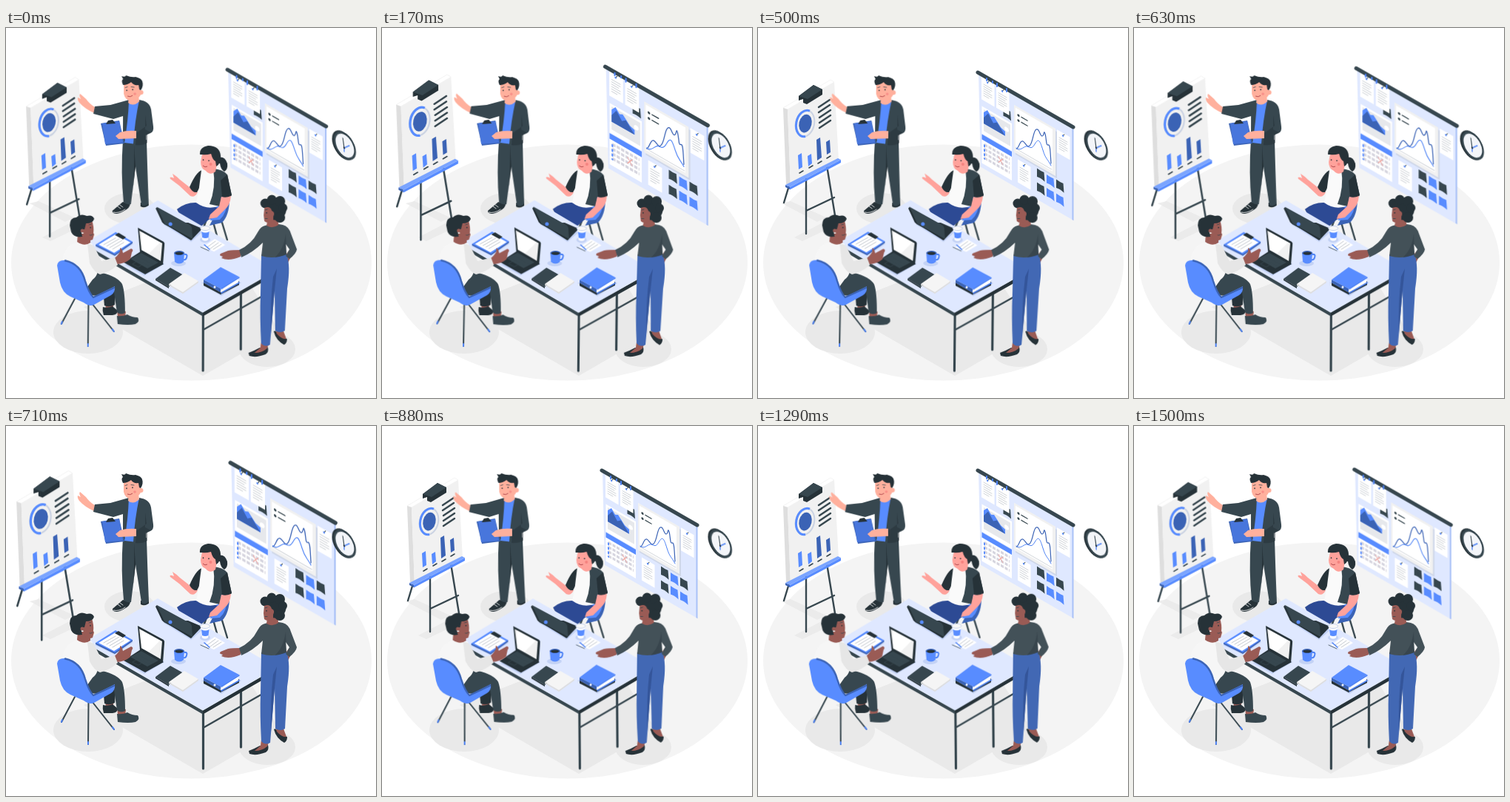
Animation of 500 by 500 pixels, one loop 1540 ms. Source, as an HTML page without scripts:

```html
<!DOCTYPE html>
<html lang="en">
<head>
<meta charset="utf-8">
<title>Team meeting</title>
<style>
html, body { margin: 0; width: 100%; height: 100%; overflow: hidden; background: #fff; }
svg { display: block; width: 100vw; height: 100vh; }

.beat { transform-origin: 234px 165px; animation: beat 1540ms linear -60ms infinite; }
@keyframes beat {
  0%, 25%, 39%, 61%, 100% { transform: scale(1); }
  11.5%, 50% { transform: scale(1.1); }
}
.sway { animation: sway 1540ms linear -60ms infinite; }
@keyframes sway {
  0%, 100% { transform: rotate(0deg); }
  25% { transform: rotate(1deg); }
  75% { transform: rotate(-1deg); }
}

.ink { fill: #263238; } .slate { fill: #37474f; } .blue { fill: #588cff; }
.deep { fill: #3b63b5; } .pale { fill: #dfe8ff; } .white { fill: #fff; }
.off { fill: #f1f1f1; } .grey { fill: #dedede; } .shade { fill: #e9e9e9; }
.skin { fill: #ffb09d; } .rosy { fill: #ffa29b; } .brown { fill: #9a5b55; }
.line { fill: none; stroke: #37474f; stroke-linecap: round; stroke-linejoin: round; }
.thin { stroke-width: .8; } .eye { stroke: #263238; stroke-width: 1.5; } .mid { stroke-width: 2.4; }
.sb { stroke: #4a80f5; } .sd { stroke: #3b63b5; } .sl { stroke: #c4c9cf; } .sw { stroke: #fff; }
</style>
</head>
<body>
<svg viewBox="0 0 500 500">
<defs>
  <g id="note">
    <path class="white" d="M0 0H17.500V31H0Z"/>
    <path class="line sl" stroke-width=".7" d="M3 9H14M3 12H14M3 15H12M3 18H14M3 21H14M3 24H10"/>
    <path class="line thin" d="M8 4L10 1"/>
    <circle class="blue" cx="8" cy="4" r="1.200"/>
  </g>
  <path id="sticky" d="M0 0Q5 1 9.500 0L10.500 12Q5 10 0 11.500Z"/>
</defs>

<!-- floor -->
<ellipse cx="250.500" cy="317" rx="243.500" ry="159.500" fill="#f4f4f4"/>
<g class="shade">
  <ellipse cx="167" cy="244" rx="34" ry="21"/>
  <ellipse cx="111" cy="411" rx="47" ry="29"/>
  <ellipse cx="353" cy="434" rx="38" ry="24"/>
  <path d="M105 377L266 470L370 410L300 300Z"/>
  <path d="M49 283L60 288L112 263L99 257ZM32 237L44 234L92 256L80 262Z" opacity=".8"/>
</g>

<g class="beat">
  <!-- wall board, drawn flat and sheared -->
  <g transform="matrix(1 .577 0 1 298 62)">
    <path class="pale" d="M0 0H127.500V124H3Z"/>
    <path d="M126.500 0H128.500V124H126.500Z" fill="#a9c1f7"/>
    <use href="#sticky" class="slate" x="33.500" y="26"/>
    <use href="#note" x="4" y="1"/>
    <use href="#note" x="24" y="1"/>
    <use href="#note" x="106" y="14"/>
    <use href="#note" x="53" y="85"/>
    <path class="white" d="M4.500 41H45V78H4.500Z"/>
    <path d="M7 44H43V73H7Z" fill="#e6e8ec"/>
    <path class="blue" d="M7 63V48L12 42L17 48L21 46L30 55L36 57V63Z"/>
    <path class="deep" d="M7 63V55L13 46L20 55L25 51L36 63Z"/>
    <circle class="white" cx="38" cy="53" r="3"/>
    <path class="white" d="M4.500 79H45V118H4.500Z"/>
    <path class="blue" d="M4.500 79H45V86H4.500Z"/>
    <path d="M8 91H42M8 97H42M8 103H42M8 109H42" fill="none" stroke="#d6d5df" stroke-width="3.500" stroke-dasharray="4 1.500"/>
    <path d="M8 91V111" fill="none" stroke="#588cff" stroke-width="2" stroke-dasharray="3.500 2.500"/>
    <path d="M27 96L33 104M33 96L27 104" fill="none" stroke="#f2a7a0"/>
    <path d="M50 17H106V80H50Z" fill="#cfd7e8"/>
    <path class="off" d="M48 14H104V78H48Z"/>
    <path class="white" d="M50 17H100V74H50Z"/>
    <circle class="slate" cx="54" cy="25" r="1.600"/><circle class="slate" cx="54" cy="32" r="1.600"/>
    <path class="line" stroke-width="1.400" d="M58 25H66M58 32H66"/>
    <path class="line sl thin" d="M51 72H99"/>
    <g class="slate"><use href="#sticky" x="79" y="82"/><use href="#sticky" x="105" y="82"/><use href="#sticky" x="79" y="101"/></g>
    <g class="blue"><use href="#sticky" x="92" y="83"/><use href="#sticky" x="92" y="101"/><use href="#sticky" x="105" y="101"/></g>
  </g>
  <path class="line sd" stroke-width="1.200" d="M349 163C352 164 354 151 358 153S364 164 368 158S372 139 376 137S381 146 384 146S386 136 388 143S389 159 392 158S395 168 396 183"/>
  <path class="line sb" d="M349 162C354 167 358 161 362 160S369 166 374 157S381 152 385 165S391 176 396 186"/>
  <path class="line" stroke-width="5" d="M297 60L426 134"/>
  <path class="line sb" stroke-width="2" d="M309 68V71M317 72V74M323 75V79M336 82V86"/>

  <!-- easel -->
  <path class="line mid" d="M42 213L35 236M65 202V278M93 186L104 253M65 247L103 229"/>
  <path class="white" d="M34 108L98 70L103 73L40 110Z" stroke="#e8e8e8" stroke-width=".5"/>
  <path class="grey" d="M34 108L40 110L44 214L38 211Z"/>
  <path class="off" d="M40 110L103 73L109 179L44 214Z"/>
  <path class="deep" d="M37 212L43 215V218L37 215Z"/>
  <path class="blue" d="M43 215L112 178V182L43 218.500Z"/>
  <path d="M37 212L108 176L112 178L43 215Z" fill="#7aa4ff"/>
  <path class="ink" d="M55 92L75 77L87 83V90L66 103L61 101V96L55 98Z"/>
  <path class="slate" d="M55 92L75 77L87 83L67 96Z"/>
  <g transform="rotate(13 63.500 129)" fill="none">
    <ellipse cx="63.500" cy="129" rx="12.500" ry="18" stroke="#cbd3e3" stroke-width="2"/>
    <path d="M66 111A12.500 18 0 1 0 68 146" stroke="#588cff" stroke-width="3"/>
    <ellipse class="deep" cx="64" cy="129" rx="8.500" ry="12.500"/>
  </g>
  <path class="line mid" d="M82 107L97 97M82 114L97 104M83 121L98 111M83 128L98 118M83 135L98 125"/>
  <path class="blue" d="M54 172L59 169L60 188L55 191ZM67 173L72 170L73 183L68 187Z"/>
  <path class="deep" d="M79 151L84 148L86 175L80 179ZM92 154L97 151L98 168L93 171Z"/>
  <path class="line" stroke-width="1.600" d="M56 196L61 193M69 189L74 186M81 183L86 180M93 176L98 173"/>
</g>

<!-- clock -->
<g class="sway" style="transform-origin:457px 159px">
  <g transform="matrix(.866 .5 0 1 457 159)">
    <circle class="ink" cx="-1" cy="0" r="18"/>
    <circle class="slate" cx="1" cy="-.5" r="17.500"/>
    <circle cx="1" cy="-.5" r="14.500" fill="#f3f5f9"/>
    <path class="line" stroke-width="1.400" d="M0 3L-2 -9"/>
    <path class="line sb" stroke-width="1.400" d="M0 3L8 -4M0 3V8"/>
    <circle class="ink" cx="0" cy="3" r="1.300"/>
  </g>
</g>

<!-- presenter -->
<g class="sway" style="transform-origin:148px 158px">
  <path class="ink" d="M144 247Q151 241 158 235L168 237Q168 243 160 247Q149 254 144 249ZM182 236H193V240Q187 244 182 241Z"/>
  <path class="line sw thin" d="M145 249Q153 251 161 245M151 241L155 244M154 239L158 242"/>
  <path class="slate" d="M158 151H190Q191 190 193 237Q187 243 183 238L175 187L169 238Q163 239 159 235Q155 196 158 151Z"/>
  <path class="ink" d="M173 158L175 187L171 223Q174 195 173 158Z"/>
  <path class="skin" d="M120 107Q113 103 108 96L100 89Q98 91 101 96L97 94Q96 97 99 101Q106 109 119 115Z"/>
  <path class="blue" d="M164 100L180 98L177 157L160 155Z"/>
  <path class="slate" d="M166 97L141 104L120 106L118 116L145 123L158 119L158 154L160 155Q165 126 166 97Z"/>
  <path class="slate" d="M180 97Q194 99 196 110L199 133Q200 140 195 142L176 151L175 142L189 132V156Q181 159 172 157Q174 125 180 97Z"/>
  <path class="ink" d="M188 117L190 132L176 142L175 158Q185 159 191 155V143L196 141L188 137Z" opacity=".55"/>
  <path class="skin" d="M166 92H179L180 99Q172 107 165 101Z"/>
  <path class="skin" d="M159 77Q165 70 180 75L183 88Q179 98 169 98Q161 98 159 89Z"/>
  <circle class="skin" cx="182.500" cy="87" r="3"/>
  <path class="ink" d="M158 77Q155 71 158 69L156 65Q161 67 162 64Q169 67 175 66Q183 68 184 72Q186 78 182 84L180 83L179 77Q172 78 169 73Q164 77 158 77Z"/>
  <path class="line eye" d="M163 84V84.500M171 83V83.500"/>
  <path class="line thin" d="M161 80.500L164 79.500M169 79.500L173 80"/>
  <path d="M164 92Q168 94 171 91" fill="none" stroke="#b64c50" stroke-width="1"/>
  <circle cx="174" cy="89" r="1.800" fill="#f88e88"/>
  <path class="deep" d="M128 129L153 125L160 156L135 159Z"/>
  <path d="M130 129L153 126L158 155L134 157Z" fill="#4876dc"/>
  <path class="ink" d="M135 130L138 125L144 124L148 129Z"/>
  <path class="skin" d="M176 139Q163 138 154 141L148 146L152 150L176 149Z"/>
</g>

<!-- seated woman -->
<g class="sway" style="transform-origin:263px 223px">
  <path class="line mid" d="M290 256L299 286M280 262L285 280M271 259L264 278"/>
  <path class="deep" d="M290 205Q302 212 302 231Q302 253 292 263L275 267Q288 245 285 216Z"/>
  <path class="blue" d="M288 206Q300 214 299 231Q299 250 289 259L276 260Z"/>
  <path d="M231 245Q246 233 265 237L286 243Q287 254 274 259L264 268L236 255Z" fill="#2d4a94"/>
  <path class="rosy" d="M251 216L259 222Q255 230 249 227L234 213L222 204Q220 200 227 203L225 197Q230 200 235 205L249 216Z"/>
  <path class="ink" d="M265 192Q257 194 248 215Q252 223 258 222L268 204Z"/>
  <path fill="#fafafa" d="M264 192H284L289 240Q272 247 257 236Q261 221 262 207Z"/>
  <path class="slate" d="M280 190Q293 191 299 198L305 226Q298 231 291 228L289 241L275 238Q284 216 280 190Z"/>
  <path class="ink" d="M290 206L292 228Q300 231 305 226L299 198Z"/>
  <path class="rosy" d="M291 228Q297 230 304 227Q303 239 296 245L285 256L274 258L276 252L288 241Z"/>
  <path class="ink" d="M284 176Q295 171 299 183Q300 191 295 194Q290 191 289 183L282 181Z"/>
  <path class="rosy" d="M265 170Q278 164 286 173L285 183L283 194Q276 200 270 193Q263 190 263 181Z"/>
  <path class="ink" d="M262 171Q261 161 273 159Q289 159 290 173Q290 184 284 187L283 180Q279 178 277 170Q270 172 265 171Z"/>
  <path class="line eye" d="M266.500 178V178.500M274 179V179.500"/>
  <path d="M266 186Q269 189 272 187" fill="none" stroke="#b64c50"/>
  <circle cx="276.500" cy="184" r="2" fill="#f4827f"/>
</g>

<!-- table -->
<g class="sway" style="transform-origin:235px 349px">
  <path class="line" stroke-width="3.200" d="M266.500 388V463M317.500 358V434M367 330V404"/>
  <path class="line mid" d="M268 407L364 352"/>
  <path class="line" stroke="#78909c" stroke-width=".8" d="M266 390V462M317 363V433"/>
  <path class="slate" d="M105 291.500L266 384.500L366 327V332L266 389.500L105 296.500Z"/>
  <path class="ink" d="M266 384.500L366 327V332L266 389.500Z"/>
  <path class="pale" d="M205 233L366 326.500L266 384.500L105 291.500Z"/>

  <g fill="#c3d2f5">
    <path d="M213 266L250 289L267 274L250 265ZM160 320L187 335L214 319L200 310Z"/>
    <ellipse cx="233" cy="318" rx="10" ry="4"/><ellipse cx="269" cy="286" rx="7" ry="4"/>
    <path d="M264 344L291 362L318 344L305 336ZM120 296L147 309L172 292Z"/>
  </g>
  <path class="ink" d="M213 264L250 287L265 271L246 263Z"/>
  <path class="slate" d="M204 242L248 266Q250 267 251 270L252 285L213 265Q209 260 204 242Z"/>
  <path class="ink" d="M204 242L202 244L211 263L250 286L252 285L214 264Z"/>
  <circle class="blue" cx="222" cy="265" r="2.500"/>

  <path class="ink" d="M159 317L182 302L213 319L188 333Z"/>
  <path class="slate" d="M168 312L183 304L206 317L191 325Z"/>
  <path class="line thin" stroke="#78909c" d="M172 311L194 322M177 308L199 320M171 319L176 316L184 320L179 323Z"/>
  <path class="ink" d="M178 270L213 289Q215 291 214 294L212 320L181 303Z"/>
  <path class="off" d="M180 274L211 291L209 315L183 300Z"/>
  <path class="white" d="M183 276L208 290L193 305L183 300Z"/>

  <path class="deep" d="M121 293V295L147 308L171 291V289Z"/>
  <path class="blue" d="M121 293L148 276L171 289L147 306Z"/>
  <path class="white" d="M125 293L148 279L168 290L146 304Z"/>
  <path class="line sl" d="M132 293L148 284M136 295L153 285M140 297L157 287M144 299L159 290"/>
  <path class="ink" d="M147 280L152 277L162 283L158 286Z"/>

  <path class="white" d="M263 271L275 271L273 286Q269 289 265 286Z"/>
  <path class="blue" d="M264 275Q269 278 274.500 275L273.500 283Q269 285 265 283Z"/>
  <ellipse cx="269" cy="270.500" rx="6.500" ry="3" fill="#f8f8f8" stroke="#b8c7e9" stroke-width=".8"/>
  <path class="white" d="M266 296L282 285L296 293L281 302Z"/>
  <path class="line sl" d="M272 296L283 288M276 298L287 290M280 299L291 292"/>
  <path class="line thin" d="M263 296L274 301"/>
  <path class="line sb" stroke-width="1.600" d="M268 293L275 299"/>

  <path fill="none" stroke="#4a80f5" stroke-width="2" d="M240 306Q246 305 244 310Q243 314 239 313"/>
  <path class="blue" d="M227 304H241L240 316Q234 321 228 316Z"/>
  <ellipse class="deep" cx="234" cy="304" rx="7" ry="3"/><ellipse class="ink" cx="234" cy="304.500" rx="5.500" ry="2"/>

  <path class="slate" d="M202 339L222 324L240 334L220 350Z"/>
  <path class="ink" d="M202 339L220 350V352L202 341Z"/>
  <path fill="#f5f5f5" d="M220 346L241 331L260 342L239 357Z"/>
  <path class="grey" d="M220 346L239 357L260 342V344L239 359L220 348Z"/>

  <path class="ink" d="M267 344L290 357L315 342V347L290 360L267 348Z"/>
  <path class="white" d="M271 342L291 354L314 338V344L291 357Z"/>
  <path class="deep" d="M267 340L290 352V357L267 344Z"/>
  <path class="blue" d="M267 340L290 323L315 336L290 352Z"/>
  <path class="line sb" stroke-width="1.500" d="M291 352L315 337M291 358L315 344"/>
  <circle class="white" cx="282" cy="350" r="1.500"/>
</g>

<!-- seated man -->
<g class="sway" style="transform-origin:122px 342px">
  <path class="brown" d="M150 379L162 383L161 391L151 390ZM134 368L146 371L144 381L135 380Z"/>
  <path class="ink" d="M131 377Q137 379 144 376L150 381Q152 387 144 388H132Q130 382 131 377Z"/>
  <path class="slate" d="M150 389Q158 390 164 387Q170 391 178 391Q182 396 175 400Q166 402 151 400Z"/>
  <path class="line" stroke-width="2" d="M93 366L75 400M111.500 374L111 430M116 372L146 410"/>
  <path class="line sb" stroke-width="2" d="M76 397L75 400M111 427V430M144 407L146 410"/>
  <path class="ink" d="M113 337Q130 334 143 341Q149 345 147 374Q140 378 133 375L131 351Z"/>
  <path class="slate" d="M105 338Q112 328 130 331Q151 336 157 346Q161 357 161 385Q154 388 150 384L146 357Q128 365 112 360Z"/>
  <path fill="#f6f6f6" d="M96 290Q82 292 77 309Q74 330 84 343L107 354L117 340Q126 334 124 318L116 291Z"/>
  <path class="blue" d="M69 321Q70 313 80 314Q101 319 107 342Q112 358 117 364L147 349Q148 357 142 361L119 374Q113 377 105 371L87 363Q76 358 73 344Z"/>
  <path class="line sd mid" d="M80 314.500Q101 319 107 342Q112 358 118 364L146 351"/>
  <path class="brown" d="M144 313Q151 308 154 302V297Q157 298 158 304L169 298Q173 299 170 303L168 312Q160 319 149 319Z"/>
  <path fill="#e6e6e6" d="M110 292Q119 291 122 301L129 315L147 310L151 320Q140 330 127 333Q119 330 113 318Z"/>
  <path class="brown" d="M97 278L114 278L114 290Q106 296 96 289Z"/>
  <path class="brown" d="M101 262L116 260Q119 269 118 277L119 279L117 286Q111 289 106 284Z"/>
  <path class="ink" d="M86 267Q86 256 95 256Q101 250 109 254Q117 252 119 258Q117 264 108 264L106 272L101 273L103 282Q92 284 88 276Z"/>
  <path class="line eye" d="M114 269.500V270"/>
  <path class="line thin" d="M112 266L115 265M113 280Q115 281 117 279"/>
  <circle class="brown" cx="103" cy="274" r="2.500"/>
</g>

<!-- standing woman -->
<g class="sway" style="transform-origin:341px 335px">
  <path class="ink" d="M362 410Q364 408 366 411L376 419L380 420Q380 426 376 428Q365 422 362 410ZM328 439Q336 436 343 432L354 431Q356 438 351 441Q338 446 329 443Z"/>
  <path class="brown" d="M364 405L375 409L379 420Q373 421 366 413ZM345 424L355 428L353 433Q346 439 336 439L344 432Z"/>
  <path class="brown" d="M373 313L382 301L388 303L381 317L376 319Z"/>
  <path d="M345 306L379 305Q385 321 380 352L377 409Q371 413 364 409L363 354L357 428Q350 432 345 426Q343 390 344 361Z" fill="#4268b4"/>
  <path d="M366 325L363 354L358 413Q357 370 361 336Z" fill="#34559a"/>
  <path class="brown" d="M317 300Q306 300 300 301L290 305Q287 308 293 309L291 311Q301 316 317 309Z"/>
  <path d="M350 267Q360 263 374 266Q382 268 385 278L393 299Q392 305 383 312L378 308L383 299L378 292L379 306Q361 313 345 308L347 290Q334 303 318 310L315 300Q332 292 340 276Q344 268 350 267Z" fill="#435158"/>
  <path class="ink" d="M378 278L379 306Q371 309 363 310Q375 300 378 278Z" opacity=".35"/>
  <path class="brown" d="M354 254L367 253L368 266Q360 272 352 267Z"/>
  <g class="ink">
    <circle cx="364" cy="245" r="14.500"/><circle cx="350" cy="237" r="6.500"/><circle cx="359" cy="232" r="6.500"/>
    <circle cx="370" cy="234" r="7"/><circle cx="374" cy="243" r="6"/><circle cx="370" cy="256" r="7"/>
  </g>
  <path class="brown" d="M349 243Q357 240 359 247Q364 249 361 255L361 261Q353 265 349 261L348 253Z"/>
  <path class="line eye" d="M352 249.500V250"/>
  <path class="line thin" d="M350 246L353 245M350 257.500L353 257.500"/>
</g>
</svg>
</body>
</html>
```
